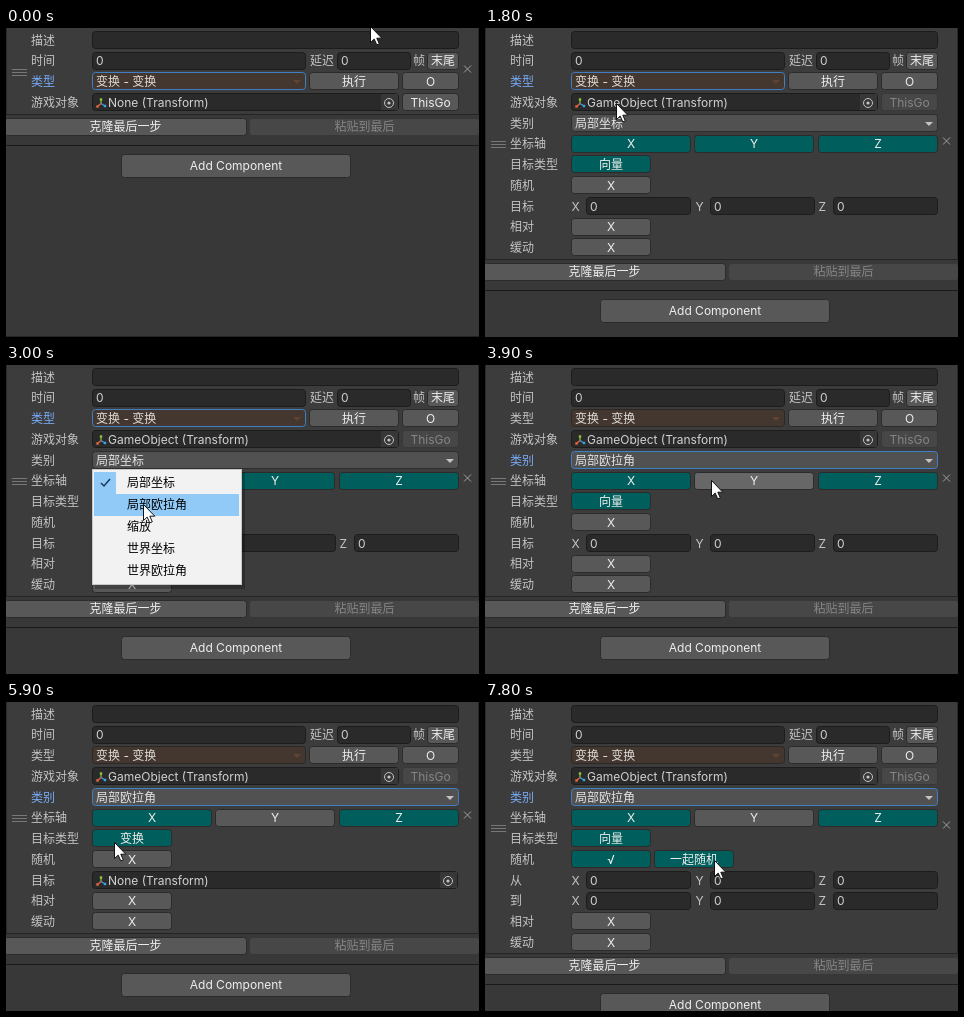
An HTML page with a canvas that plays this animation: 473 by 309 pixels, repeating every 8 s.

```html
<!DOCTYPE html>
<html lang="zh-CN">
<head>
<meta charset="utf-8">
<title>Inspector</title>
<style>
html, body { margin: 0; width: 100%; height: 100%; overflow: hidden; background: #383838; }
canvas { display: block; width: 473px; height: 309px; }
</style>
</head>
<body>
<canvas id="stage" width="473" height="309"></canvas>
<script>
const W = 473, H = 309, LOOP = 8000, STEP = 100;
const FONT = '12px Inter, "Noto Sans CJK SC", "Noto Sans CJK", sans-serif';
const MENU_FONT = '500 12px "Noto Sans CJK SC", "Noto Sans CJK", sans-serif';
const TEAL = '#005f5c', BLUE = '#3f7fc4';
const MENU = ['局部坐标', '局部欧拉角', '缩放', '世界坐标', '世界欧拉角'];

const main = document.getElementById('stage').getContext('2d');
const layer = document.createElement('canvas');
layer.width = W;
layer.height = H;
const menuCtx = layer.getContext('2d');
let ctx = main;
let pointer = null;

// Pointer stops: time, x, y
const PATH = [
  [1000, 18, 7], [1200, 93, 46], [1400, 125, 76], [1600, 131, 75], [1800, 131, 75],
  [2200, 143, 88], [2500, 143, 88], [3000, 137, 139], [3200, 137, 139], [3600, 226, 115],
  [3900, 226, 115], [4200, 345, 115], [4800, 345, 115], [5100, 100, 140], [5500, 104, 140],
  [5700, 104, 140], [5900, 108, 140], [6500, 108, 140], [6900, 127, 157],
  [7100, 127, 157], [7500, 229, 158]
];

function pointerAt(t) {
  if (t < 100) return [364, -2];
  if (t < PATH[0][0]) return null;
  const i = PATH.findIndex(p => p[0] > t);
  if (i < 0) return PATH[PATH.length - 1].slice(1);
  const [t0, x0, y0] = PATH[i - 1], [t1, x1, y1] = PATH[i];
  const k = (t - t0) / (t1 - t0);
  return [Math.round(x0 + (x1 - x0) * k), Math.round(y0 + (y1 - y0) * k)];
}

const between = (t, a, b) => t >= a && t < b;

// Rows fall between pixels: boxes snap up, text snaps to the nearest line
const rowTop = n => 3.3 + 20.75 * n;
const textLine = y => Math.round(y + .3);

function rect(x, y, w, h, color) {
  ctx.fillStyle = color;
  ctx.fillRect(x, y, w, h);
}

function text(s, x, cy, color = '#c4c4c4', align = 'left') {
  ctx.fillStyle = color;
  ctx.textAlign = align;
  ctx.fillText(s, x, textLine(cy) + 4);
}

function box(x, y, w, h, fill, border, radius = 3) {
  ctx.beginPath();
  ctx.roundRect(x + .5, Math.floor(y) + .5, w - 1, h - 1, radius);
  ctx.fillStyle = fill;
  ctx.fill();
  ctx.strokeStyle = border;
  ctx.lineWidth = 1;
  ctx.stroke();
}

function line(points, color, width = 1) {
  ctx.beginPath();
  points.forEach(([x, y]) => ctx.lineTo(x, y));
  ctx.strokeStyle = color;
  ctx.lineWidth = width;
  ctx.stroke();
}

function triangle(x, cy, color) {
  const y = textLine(cy);
  ctx.beginPath();
  ctx.moveTo(x - 4, y - 2);
  ctx.lineTo(x + 4, y - 2);
  ctx.lineTo(x, y + 2);
  ctx.fillStyle = color;
  ctx.fill();
}

function button(s, x, y, w, { h = 18, on, pressed, disabled } = {}) {
  const hover = pointer && pointer[0] >= x && pointer[0] < x + w && pointer[1] >= y && pointer[1] < y + h;
  let fill = hover ? '#676767' : '#585858';
  if (on) fill = TEAL;
  if (pressed) fill = '#46607c';
  if (disabled) fill = '#474747';
  box(x, y, w, h, fill, disabled ? '#383838' : '#2b2b2b');
  text(s, x + w / 2, y + h / 2, disabled ? '#858585' : '#eeeeee', 'center');
}

function field(s, x, y, w) {
  box(x, y, w, 18, '#2a2a2a', '#1c1c1c');
  text(s, x + 4, y + 9, '#d2d2d2');
}

function axisIcon(x, y) {
  const arms = [[0, -4, '#8cc63f'], [-3.5, 3, '#e8663c'], [4, 2.5, '#3fa0e0']];
  for (const [dx, dy, color] of arms) {
    line([[x, y], [x + dx, y + dy]], color, 1.2);
    rect(x + dx - 1.2, y + dy - 1.2, 2.4, 2.4, color);
  }
}

function objectField(s, y, w, active) {
  const cx = 86 + w - 10, cy = textLine(y + 9);
  box(86, y, w, 18, '#2a2a2a', active ? BLUE : '#1c1c1c');
  axisIcon(95, cy + .5);
  text(s, 102, y + 9, '#d2d2d2');
  rect(cx - 8, Math.floor(y) + 1, 17, 16, '#373737');
  ctx.beginPath();
  ctx.arc(cx, cy, 4.5, 0, 7);
  ctx.strokeStyle = '#c4c4c4';
  ctx.lineWidth = 1;
  ctx.stroke();
  ctx.beginPath();
  ctx.arc(cx, cy, 1.6, 0, 7);
  ctx.fillStyle = '#c4c4c4';
  ctx.fill();
}

function label(s, n, focused) {
  text(s, 25, rowTop(n) + 9, focused ? '#78abf7' : '#c4c4c4');
}

function vectorRow(s, n) {
  const y = rowTop(n);
  label(s, n);
  ['X', 'Y', 'Z'].forEach((axis, i) => {
    const x = 101 + Math.round(i * 123.5);
    text(axis, x - 14.5, y + 9);
    field('0', x, y, 105);
  });
}

function header(t, assigned) {
  const typeFocus = t < 700 || between(t, 1000, 3200);
  label('描述', 0);
  field('', 86, rowTop(0), 367);

  let y = rowTop(1);
  label('时间', 1);
  field('0', 86, y, 214);
  text('延迟', 304, y + 9);
  field('0', 331, y, 74);
  text('帧', 407, y + 9);
  button('末尾', 421, y, 32);

  y = rowTop(2);
  label('类型', 2, typeFocus);
  box(86, y, 214, 18, '#43372f', typeFocus ? BLUE : '#2b2725');
  text('变换 - 变换', 90, y + 9, '#e0dcd8');
  triangle(291, y + 9, '#5f4334');
  button('执行', 303, y, 90);
  button('O', 396, y, 57);

  y = rowTop(3);
  label('游戏对象', 3);
  objectField(assigned ? 'GameObject (Transform)' : 'None (Transform)', y, 307, between(t, 1400, 1800));
  button('ThisGo', 396, y, 57, { disabled: assigned });
}

function details(t, random) {
  const chosen = t >= 3200;
  let y = rowTop(4);
  label('类别', 4, chosen);
  box(86, y, 367, 18, '#515151', chosen ? BLUE : '#2d2d2d');
  text(MENU[chosen ? 1 : 0], 90, y + 9, '#e4e4e4');
  triangle(444, y + 9, '#c4c4c4');

  y = rowTop(5);
  label('坐标轴', 5);
  button('X', 86, y, 120, { on: true });
  button('Y', 209, y, 120, { on: t < 3900, pressed: between(t, 3800, 3900) });
  button('Z', 333, y, 120, {
    on: !between(t, 4400, 4700),
    pressed: between(t, 4300, 4400) || between(t, 4600, 4700)
  });

  const byObject = between(t, 5700, 6500);
  label('目标类型', 6);
  button(byObject ? '变换' : '向量', 86, rowTop(6), 80, { on: true });

  y = rowTop(7);
  label('随机', 7);
  button(random ? '√' : 'X', 86, y, 80, { on: random, pressed: between(t, 6900, 7100) });

  let n = 8;
  if (random) {
    button(t < 7800 ? '分别随机' : '一起随机', 169, y, 80, { on: true });
    vectorRow('从', n++);
    vectorRow('到', n++);
  } else if (byObject) {
    label('目标', n);
    objectField('None (Transform)', rowTop(n++), 366);
  } else {
    vectorRow('目标', n++);
  }
  for (const s of ['相对', '缓动']) {
    label(s, n);
    button('X', 86, rowTop(n++), 80);
  }
}

function frameAndFooter(bottom) {
  rect(0, 0, W, H, '#383838');
  rect(0, 0, W, bottom, '#3c3c3c');
  rect(0, bottom, W, 1, '#242424');
  rect(0, 0, 1, bottom, '#2a2a2a');
  rect(472, 0, 1, bottom, '#2a2a2a');

  const mid = Math.round(bottom / 2 + .5);
  for (const dy of [-3, 0, 3]) rect(6, mid + dy, 15, 1, '#787878');
  line([[458, mid - 6.5], [465, mid + .5]], '#a0a0a0');
  line([[465, mid - 6.5], [458, mid + .5]], '#a0a0a0');

  button('克隆最后一步', -2, bottom + 4, 243);
  button('粘贴到最后', 243, bottom + 4, 231, { disabled: true });
  rect(0, bottom + 31, W, 1, '#1a1a1a');
  button('Add Component', 115, bottom + 40, 230, { h: 24 });
  if (bottom < 100) rect(0, 308, W, 1, '#242424');
}

function drawMenu(alpha) {
  const top = 107, itemHeight = 22;
  ctx = menuCtx;
  ctx.clearRect(0, 0, W, H);
  rect(89, 107, 150, 117, 'rgba(0,0,0,.25)');
  rect(86, 104, 150, 116, '#c8c8c8');
  rect(87, 105, 148, 114, '#f2f2f2');
  const hot = Math.floor((pointer[1] - top) / itemHeight);
  if (hot >= 0) rect(88, top + hot * itemHeight, 145, itemHeight, '#91c9f7');
  rect(88, top, 22, itemHeight, '#91c9f7');
  line([[95, 118], [98, 121], [104, 114]], '#173a5c', 1.5);
  ctx.font = MENU_FONT;
  MENU.forEach((s, i) => text(s, 121, top + 11 + i * itemHeight, '#000'));
  ctx = main;
  ctx.globalAlpha = alpha;
  ctx.drawImage(layer, 0, 0);
  ctx.globalAlpha = 1;
}

function drawArrow(x, y) {
  const shape = [[0, 0], [0, 16], [3.7, 12.6], [6.3, 18.4], [8.8, 17.3], [6.3, 11.7], [11.3, 11.7]];
  ctx.beginPath();
  shape.forEach(([dx, dy]) => ctx.lineTo(x + .5 + dx, y + .5 + dy));
  ctx.closePath();
  ctx.fillStyle = '#fff';
  ctx.fill();
  ctx.strokeStyle = '#111';
  ctx.lineWidth = 1;
  ctx.stroke();
}

function drawForbidden(x, y) {
  for (const [color, width] of [['#fff', 4.5], ['#000', 2.2]]) {
    ctx.beginPath();
    ctx.arc(x, y, 6, 0, 7);
    ctx.moveTo(x - 4.2, y - 4.2);
    ctx.lineTo(x + 4.2, y + 4.2);
    ctx.strokeStyle = color;
    ctx.lineWidth = width;
    ctx.stroke();
  }
}

function drawPointer(t) {
  if (!pointer) return;
  const [x, y] = pointer;
  if (between(t, 1000, 1400)) return drawForbidden(x, y);
  drawArrow(x, y);
  if (between(t, 1400, 1800)) {
    box(x + 9, y + 14, 9, 8, '#fff', '#111', 0);
    rect(x + 11, y + 18, 5, 1, '#111');
    rect(x + 13, y + 16, 1, 5, '#111');
  }
}

function draw(t) {
  const assigned = t >= 1800, random = t >= 7100;
  const menuOpen = between(t, 2400, 3200);
  const position = pointerAt(t);
  pointer = menuOpen || t < 1800 ? null : position;
  ctx.font = FONT;
  frameAndFooter(random ? 251 : assigned ? 231 : 86);
  header(t, assigned);
  if (assigned) details(t, random);
  pointer = position;
  if (menuOpen) drawMenu(t < 2500 ? .2 : t < 2600 ? .7 : 1);
  drawPointer(t);
}

const start = performance.now();
function tick() {
  const t = (performance.now() - start) % LOOP;
  draw(Math.floor(t / STEP) * STEP);
  requestAnimationFrame(tick);
}
tick();
</script>
</body>
</html>
```
